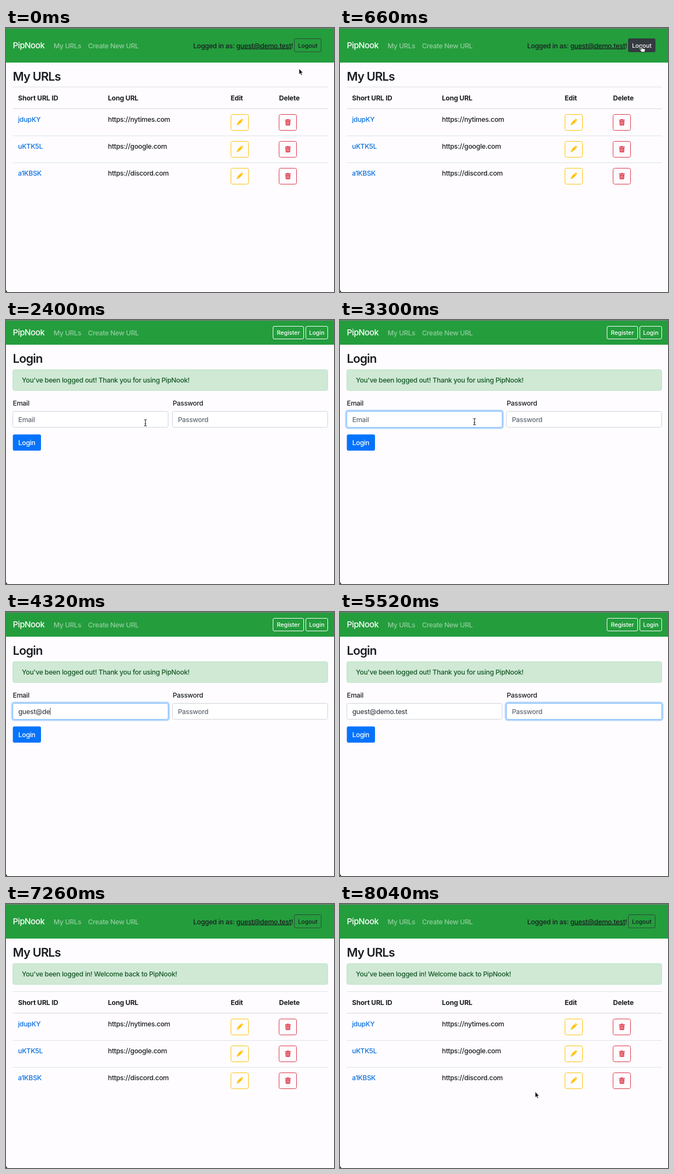
Animation of 600 by 481 pixels, one loop 8.1 s. Source, as an HTML page:

```html
<!DOCTYPE html>
<html lang="en">
<head>
<meta charset="utf-8">
<title>URL shortener login</title>
<style>
  html, body { margin: 0; width: 100%; height: 100%; overflow: hidden; background: #fefcff; }
  svg { display: block; width: 600px; height: 481px; }
  text { font: 450 12.3px Inter, "Liberation Sans", sans-serif; letter-spacing: -.02em; font-optical-sizing: none; fill: #1a1d21; white-space: pre; }
  .brand { font-size: 15.2px; letter-spacing: -.03em; fill: #fff; }
  .nav { fill: #fff; fill-opacity: .5; }
  .title { font-size: 21.8px; font-weight: 560; letter-spacing: -.037em; }
  .head text { font-weight: 700; letter-spacing: -.012em; }
  .small { font-size: 10.7px; letter-spacing: 0; text-anchor: middle; }
  .link { fill: #0a70dd; }
  .white { fill: #fff; }
  .hint { fill: #626a72; }
  .value { fill: #3f464d; }
  .success { fill: #155724; }
  .alert { fill: #cfe9d5; stroke: #bfe3c8; }
  .field { fill: #fff; stroke: #ced4da; }
  .line { stroke: #dee2e6; }
  .dark { fill: none; stroke: #2d4b39; }
  .pale { fill: none; stroke: #fff; }

  .list, .login, .flash, .table, .logout, .relogin, .status, .arrow, .hand, .beam {
    animation: 8.1s step-end infinite;
  }
  .list { animation-name: list; }
  .login { animation-name: login; }
  .flash { animation-name: flash; }
  .table { animation-name: table; }
  .logout { animation-name: logout; }
  .relogin { animation-name: relogin; }
  .arrow { animation-name: arrow; }
  .hand { animation-name: hand; }
  .beam { animation-name: beam; }
  .status { animation-name: status; animation-timing-function: linear; }
  .cursor { animation: move 8.1s ease-in-out infinite; }
  .ring { fill: none; stroke: #80bdff; opacity: 0; animation: 8.1s ease-in-out infinite; }
  .ring .glow { stroke: #007bff; stroke-opacity: .3; stroke-width: 2.6; }
  .ring.a { animation-name: ringA; }
  .ring.b { animation-name: ringB; }

  @keyframes list { 0%, 85.93%, 100% { opacity: 1 } 8.89% { opacity: 0 } }
  @keyframes login { 0%, 85.93%, 100% { opacity: 0 } 8.89% { opacity: 1 } }
  @keyframes flash { 0%, 100% { opacity: 0 } 50% { opacity: 1 } }
  @keyframes table { 0%, 100% { transform: none } 50% { transform: translateY(52px) } }
  @keyframes logout { 0%, 8.89%, 100% { opacity: 0 } 2.96% { opacity: 1 } }
  @keyframes relogin { 0%, 12.1%, 100% { opacity: 0 } 8.89% { opacity: 1 } }
  @keyframes status { 0%, 9.6% { opacity: 0 } 9.7%, 15.5% { opacity: 1 } 16.9%, 100% { opacity: 0 } }
  @keyframes arrow { 0%, 12.1%, 91.85%, 100% { opacity: 1 } 2.96%, 25.93% { opacity: 0 } }
  @keyframes hand { 0%, 12.1%, 100% { opacity: 0 } 2.96% { opacity: 1 } }
  @keyframes beam { 0%, 41.48%, 100% { opacity: 0 } 25.93% { opacity: 1 } }
  @keyframes move {
    0% { transform: translate(536px, 74px) }
    4.44%, 11.2% { transform: translate(552px, 33px) }
    14.07%, 17% { transform: translate(546px, 107px) }
    28.89%, 30% { transform: translate(255px, 187px) }
    32%, 91.85% { transform: translate(246px, 185px) }
    98%, 100% { transform: translate(357px, 342px) }
  }
  @keyframes ringA { 0%, 32.6% { opacity: 0 } 34.4%, 61.4% { opacity: 1 } 63.2%, 100% { opacity: 0 } }
  @keyframes ringB { 0%, 61.4% { opacity: 0 } 63.2%, 99% { opacity: 1 } 100% { opacity: 0 } }
</style>
</head>
<body>
<svg viewBox="0 0 600 481">
  <defs>
    <g id="menu">
      <text class="brand" x="12.5" y="37">PipNook</text>
      <text class="nav" x="87" y="36.5">My URLs</text>
      <text class="nav" x="150" y="36.5">Create New URL</text>
    </g>
    <g id="tools">
      <g fill="#ffc107">
        <rect x="411.5" y="157.5" width="32" height="29" rx="3" fill="none" stroke="#ffc107"/>
        <path transform="translate(427.3 171.8) rotate(45) scale(1.08)" d="M-2-4.5h4V3h-4zM-2-6.9h4v1.7h-4zM-2 3.4h4L0 7z"/>
      </g>
      <g fill="#dc3545">
        <rect x="499.5" y="157.5" width="32" height="29" rx="3" fill="none" stroke="#dc3545"/>
        <path d="M510.5 167h3.2l.6-1h2.8l.6 1h3.2v1.6h-10.4zM511.2 169.3h9l-.6 8.2h-7.8z"/>
        <path d="M513.6 170.6v5.4M515.7 170.6v5.4M517.8 170.6v5.4" stroke="#fff" stroke-width=".7"/>
      </g>
    </g>
  </defs>

  <rect width="600" height="481" fill="#fefcff"/>

  <g class="list">
    <rect width="600" height="63" fill="#249d3d"/>
    <use href="#menu"/>
    <text x="342.5" y="36.5">Logged in as: <tspan text-decoration="underline">guest@demo.test</tspan>!</text>
    <rect class="dark" x="527.5" y="19.5" width="49" height="24" rx="2.5"/>
    <text class="small" x="552" y="35.7">Logout</text>
    <g class="logout">
      <rect x="527" y="19" width="50" height="25" rx="3" fill="#343a40"/>
      <text class="small white" x="552" y="35.7">Logout</text>
    </g>
    <text class="title" x="12.5" y="96">My URLs</text>
    <g class="flash">
      <rect class="alert" x="12.5" y="108.5" width="576" height="38" rx="3"/>
      <text class="success" x="29" y="132">You've been logged in! Welcome back to PipNook!</text>
    </g>
    <g class="table">
      <path class="line" d="M12.5 107.5H589M12.5 196.500H589M12.5 245.500H589"/>
      <path class="line" stroke-width="1.7" d="M12.5 147H589"/>
      <g class="head">
        <text x="22" y="132">Short URL ID</text>
        <text x="186.5" y="132">Long URL</text>
        <text x="411" y="132">Edit</text>
        <text x="499.5" y="132">Delete</text>
      </g>
      <g>
        <text class="link" x="22" y="171">jdupKY</text>
        <text x="186.5" y="171">https://nytimes.com</text>
        <use href="#tools"/>
      </g>
      <g transform="translate(0 49)">
        <text class="link" x="22" y="171">uKTK5L</text>
        <text x="186.5" y="171">https://google.com</text>
        <use href="#tools"/>
      </g>
      <g transform="translate(0 98)">
        <text class="link" x="22" y="171">a1KBSK</text>
        <text x="186.5" y="171">https://discord.com</text>
        <use href="#tools"/>
      </g>
    </g>
  </g>

  <g class="login">
    <rect width="600" height="45" fill="#249d3d"/>
    <use href="#menu" y="-9"/>
    <rect class="pale" x="488.5" y="11.5" width="56" height="23" rx="2.5"/>
    <rect class="pale" x="548.5" y="11.5" width="40" height="23" rx="2.5"/>
    <text class="small white" x="516.5" y="27.2" font-weight="500">Register</text>
    <text class="small white" x="568.5" y="27.2">Login</text>
    <g class="relogin">
      <rect x="548" y="11" width="41" height="24" rx="3" fill="#f8f9fa"/>
      <text class="small" x="568.5" y="27.2">Login</text>
    </g>
    <text class="title" x="12.5" y="78">Login</text>
    <rect class="alert" x="12.5" y="90.5" width="576" height="38" rx="3"/>
    <text class="success" x="29" y="114">You've been logged out! Thank you for using PipNook!</text>

    <text x="12.5" y="155.5">Email</text>
    <text x="305" y="155.5">Password</text>
    <rect class="field" x="12.5" y="166.5" width="284" height="29" rx="3"/>
    <rect class="field" x="304.5" y="166.5" width="284" height="29" rx="3"/>
    <g class="ring a">
      <rect class="glow" x="10.7" y="164.7" width="287.6" height="32.6" rx="4.5"/>
      <rect x="12.5" y="166.5" width="284" height="29" rx="3"/>
    </g>
    <g class="ring b">
      <rect class="glow" x="302.7" y="164.7" width="287.6" height="32.6" rx="4.5"/>
      <rect x="304.5" y="166.5" width="284" height="29" rx="3"/>
    </g>
    <text class="hint" id="emailHint" x="22.5" y="186">Email</text>
    <text class="value" id="email" x="22.5" y="186"></text>
    <text class="hint" id="passHint" x="314.5" y="186">Password</text>
    <g id="dots" fill="#3f464d">
      <circle cx="317.6" cy="181.7" r="1.5"/>
      <circle cx="323.1" cy="181.7" r="1.5"/>
      <circle cx="328.6" cy="181.7" r="1.5"/>
    </g>
    <rect id="caret" y="174.5" width="1" height="13.5" fill="#3f464d"/>
    <rect x="12.5" y="208.5" width="51.5" height="29.5" rx="3" fill="#0673fb"/>
    <text class="white" x="22.5" y="228">Login</text>
  </g>

  <rect width="600" height="1.3" fill="#75807c"/>
  <path d="M0 476q.3 4 3 5H0z" fill="#111"/>

  <g class="status">
    <path d="M0 469H97q3.5 0 3.5 3.5V481H0z" fill="#3a3a3d"/>
    <text x="4" y="480" style="font-size:9.4px;letter-spacing:0;fill:#e4e4e6">localhost:8080/login</text>
  </g>

  <g class="cursor">
    <path class="arrow" d="M0 0V10.6L2.4 8.5 4 12.2 5.9 11.4 4.3 7.8H7.5z" fill="#111" stroke="#fff" stroke-width=".8"/>
    <path class="hand" d="M-1 0q1-1 2 0V4l4 .8q1.5.5 1.3 2L5.5 11H-.5L-3.8 6.6q0-1.500 1.500-1L-1 6.6z" fill="#fff" stroke="#111" stroke-width=".9"/>
    <path class="beam" d="M-2.5-5.5Q0-5.5 0-4 0-5.5 2.5-5.5M0-4.500V5M-2.5 6Q0 6 0 4.5 0 6 2.5 6M-1.3 2H1.3" fill="none" stroke="#222" stroke-width="1.1"/>
  </g>
</svg>
<script>
  const LOOP = 8100;
  const ADDRESS = 'guest@demo.test';
  const EMAIL = { focus: 2640, first: 3745, gap: 80, size: ADDRESS.length };
  const PASS = { focus: 4980, first: 6090, gap: 180, size: 3 };
  const el = id => document.getElementById(id);
  const show = (node, on) => node.setAttribute('visibility', on ? 'inherit' : 'hidden');
  const email = el('email'), caret = el('caret'), dots = [...el('dots').children];

  const typed = (field, t) =>
    Math.max(0, Math.min(field.size, Math.floor((t - field.first) / field.gap) + 1));

  // The caret blinks each half second, counted from the last key.
  function caretOn(field, count, t) {
    const last = count ? field.first + (count - 1) * field.gap : field.focus;
    return t >= field.focus && (t - last) % 1000 < 500;
  }

  function draw(t) {
    const letters = typed(EMAIL, t), marks = typed(PASS, t);
    const inPass = t >= PASS.focus;
    email.textContent = ADDRESS.slice(0, letters);
    show(el('emailHint'), !letters);
    show(el('passHint'), !marks);
    dots.forEach((dot, i) => show(dot, i < marks));
    const x = inPass ? 314.5 + marks * 5.6
      : 22.5 + (letters ? email.getComputedTextLength() : 0);
    caret.setAttribute('x', x);
    show(caret, inPass ? caretOn(PASS, marks, t) : caretOn(EMAIL, letters, t));
  }

  let start;
  function tick(now) {
    start ??= now;
    draw((now - start) % LOOP);
    requestAnimationFrame(tick);
  }
  draw(0);
  requestAnimationFrame(tick);
</script>
</body>
</html>
```
